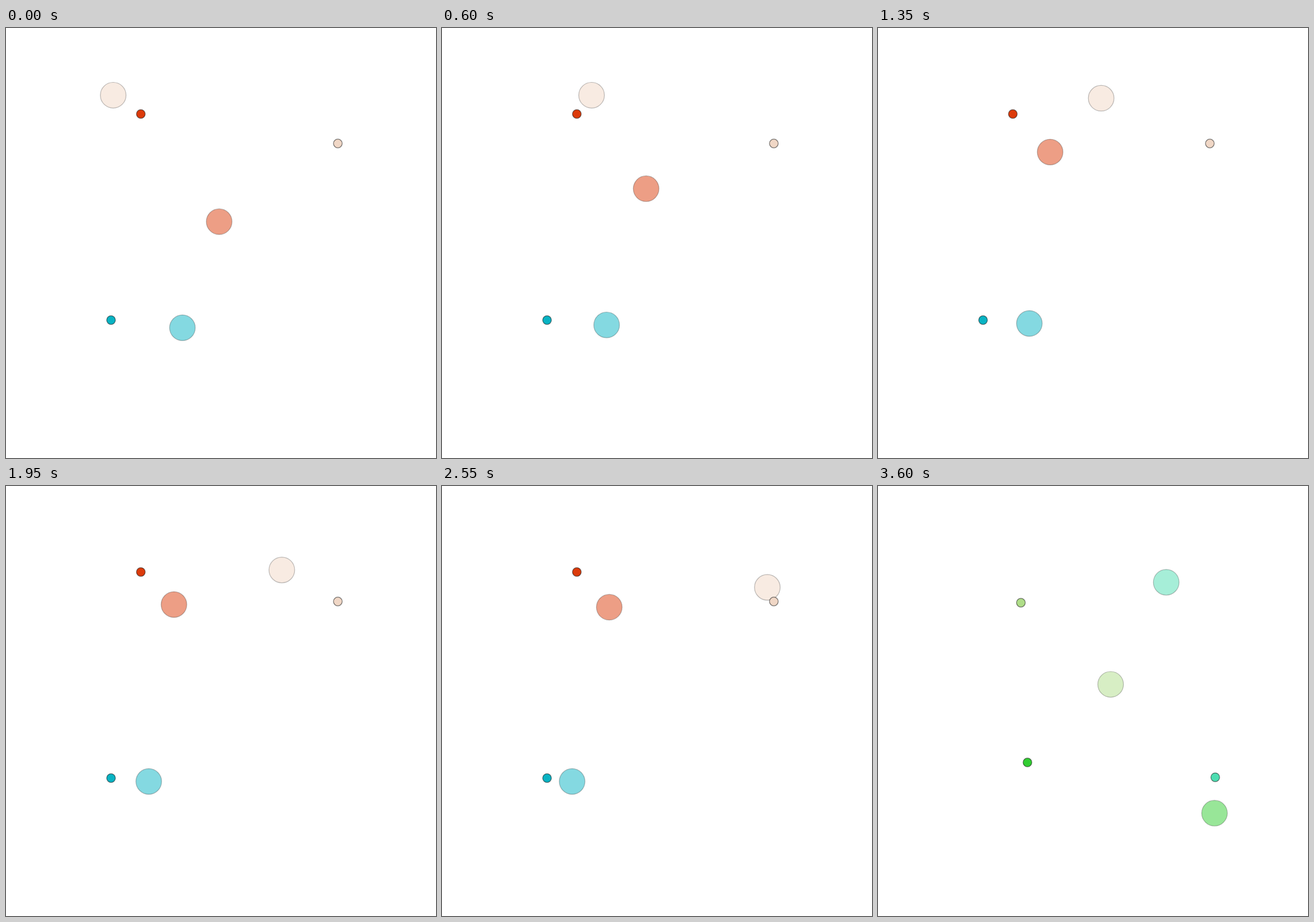
An HTML page that plays this animation: 700 px wide and 700 px high, repeating every 3.75 s.

```html
<!DOCTYPE html>
<html lang="en">
<head>
<meta charset="utf-8">
<title>Clusters</title>
<style>
html, body { margin: 0; width: 100%; height: 100%; overflow: hidden; background: #fff; }
svg { display: block; width: 100%; height: 100%; }
</style>
</head>
<body>
<svg id="stage" viewBox="0 0 700 700"></svg>
<script>
const STEP = 150, STEPS = 25, LAST = STEPS - 1;
const svg = document.getElementById('stage');

// Each mover follows a smooth curve through its points at these steps.
const keys = [0, 2, 4, 9, 13, 17, 21, 23];
const cream = [[174.5, 109.4], [202.7, 109.4], [243.5, 109.4], [363.3, 114.3],
  [449, 136.7], [529.6, 165], [568.4, 186.5], [573.4, 193]];
const coral = [[347, 315.3], [344.6, 288.4], [332.3, 261.6], [280.2, 202],
  [273.4, 193], [272.3, 197.3], [268.6, 184.8], [265.5, 181]];
const teal = [[287.2, 488], [277.5, 485.6], [268, 483.4], [246.4, 481],
  [232.4, 481], [211.8, 481], [204.8, 480.5], [203, 480.4]];

function slope(path, k, axis) {
  const a = Math.max(k - 1, 0), b = Math.min(k + 1, keys.length - 1);
  return (path[b][axis] - path[a][axis]) / (keys[b] - keys[a]);
}

// Cubic Hermite interpolation
function along(path, step, axis) {
  let k = 0;
  while (k < keys.length - 2 && keys[k + 1] <= step) k++;
  const h = keys[k + 1] - keys[k], t = (step - keys[k]) / h, u = 1 - t;
  return path[k][axis] * u * u * (1 + 2 * t) + path[k + 1][axis] * t * t * (3 - 2 * t)
    + h * t * u * (u * slope(path, k, axis) - t * slope(path, k + 1, axis));
}

function add(parent, tag, attrs = {}) {
  const el = document.createElementNS(svg.namespaceURI, tag);
  for (const key in attrs) el.setAttribute(key, attrs[key]);
  return parent.appendChild(el);
}

function place(el, x, y) {
  el.setAttribute('cx', x);
  el.setAttribute('cy', y);
}

function disc(parent, big, fill, x = 0, y = 0) {
  return add(parent, 'circle', {
    cx: x, cy: y, r: big ? 20.9 : 7.1, fill,
    stroke: '#000', 'stroke-width': 1.2, 'stroke-opacity': big ? 0.25 : 0.5
  });
}

const first = add(svg, 'g'), second = add(svg, 'g');

const movers = [[cream, '#f8ebe2'], [coral, '#ed9e85'], [teal, '#84d9e1']]
  .map(([path, fill]) => ({ path, el: disc(first, true, fill) }));
disc(first, false, '#f0d7c6', 540.2, 188);
disc(first, false, '#dc3b0b', 219.5, 140);
disc(first, false, '#09b3c3', 171, 475.5);

disc(second, true, '#a6eed8', 469.2, 156.7);
disc(second, true, '#d7eec4', 378.7, 322.9);
disc(second, true, '#98e698', 547.8, 532.6);
disc(second, false, '#4dddb1', 549, 474.2);
disc(second, false, '#afdd88', 232.6, 190);
disc(second, false, '#32cd32', 243.3, 450);

function draw(ms) {
  const step = Math.floor(ms / STEP) % STEPS;
  const end = step === LAST;
  first.style.display = end ? 'none' : '';
  second.style.display = end ? '' : 'none';
  if (end) return;
  for (const { path, el } of movers) place(el, along(path, step, 0), along(path, step, 1));
}

const start = performance.now();
function tick() {
  draw(performance.now() - start);
  requestAnimationFrame(tick);
}
tick();
</script>
</body>
</html>
```
